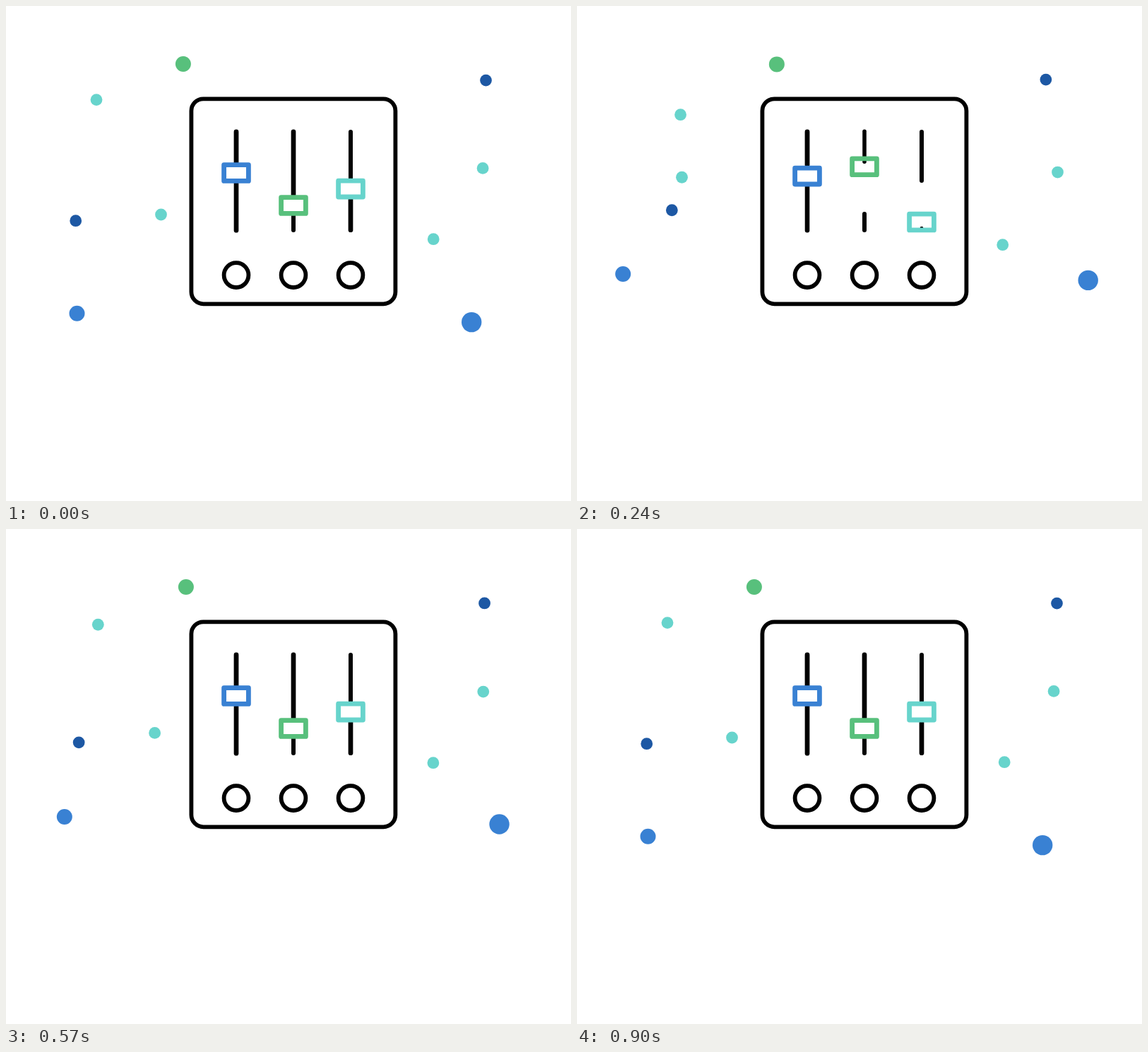
These frames come from a looping animation (800 by 700 pixels, 930 ms). An HTML page:

```html
<!DOCTYPE html>
<html lang="en">
<head>
<meta charset="utf-8">
<title>Mixer panel</title>
<style>
  html, body { margin: 0; width: 100%; height: 100%; overflow: hidden; background: #fff; }
  svg { display: block; width: 800px; height: 700px; }
</style>
</head>
<body>
<svg viewBox="0 0 800 700" fill="none" stroke="#000" stroke-linecap="round" stroke-linejoin="round">
  <rect x="262.4" y="131.3" width="289" height="290" rx="17" stroke-width="5.8"/>
</svg>
<script>
const LOOP = 930, STEP = 30, END = 900;
const BLUE = '#3981d3', NAVY = '#1d58a4', TEAL = '#67d4cc', GREEN = '#58c07c';
const svg = document.querySelector('svg');

function add(tag, attrs) {
  const el = document.createElementNS('http://www.w3.org/2000/svg', tag);
  set(el, attrs);
  return svg.appendChild(el);
}
function set(el, attrs) {
  for (const k in attrs) el.setAttribute(k, attrs[k]);
}
const mix = (a, b, p) => a + (b - a) * p;
const clamp = p => Math.max(0, Math.min(1, p));
const linear = u => u;
const cubic = u => u ** 3;

// Resting place (x, y) and starting offset (dx, dy); ease acts on the time left.
// "late" is an offset kept until the dot snaps to rest.
const dots = [
  { color: GREEN, r: 11, x: 250.9, y: 82, dx: 81, dy: 1 },
  { color: TEAL, r: 8.4, x: 128, y: 132.6, dx: 47, dy: 53.5 },
  { color: TEAL, r: 8.4, x: 219.5, y: 295, dx: -180, dy: -133.8 },
  { color: NAVY, r: 8.4, x: 98.7, y: 303.7, dx: 90.4, dy: -37.9 },
  { color: NAVY, r: 8.4, x: 679.5, y: 105.1, dx: -39.6, dy: -2.6 },
  { color: TEAL, r: 8.4, x: 675.1, y: 229.4, dx: 13.7, dy: 14.3 },
  { color: TEAL, r: 8.4, x: 605.2, y: 329.7, dx: -6.3, dy: 20.3 },
  { color: BLUE, r: 11, x: 100.5, y: 434.8, dx: -48.2, dy: -76, ease: linear },
  { color: BLUE, r: 14.2, x: 659.2, y: 447.1, dx: 68.6, dy: -80.8, ease: linear, late: 14.2 }
];
for (const d of dots) d.el = add('circle', { r: d.r, fill: d.color, stroke: 'none' });

// fixed: still part of the track; tip: moving end of the growing part, from its root.
const sliders = [
  { x: 326, color: BLUE, start: 0, end: 255, knob: [314, 236], tip: [321, 244.5], root: 320.5, fixed: [174.5, 228], width: 6.8 },
  { x: 407, color: GREEN, start: 60, end: 420, knob: [172.6, 282], tip: [172, 274], root: 174.5, fixed: [291, 320], width: 6 },
  { x: 488, color: TEAL, start: 180, end: 570, knob: [314, 258.6], tip: [320, 267], root: 320, fixed: [175, 250], width: 6 }
];
const track = (x, [y1, y2], w) =>
  add('line', { x1: x, x2: x, y1: y1 + w / 2, y2: y2 - w / 2, 'stroke-width': w });

for (const s of sliders) {
  track(s.x, s.fixed, s.width);
  s.grow = add('line', { x1: s.x, x2: s.x });
  s.box = add('rect', { x: s.x - 17.4, width: 34.8, height: 22.8, stroke: s.color, 'stroke-width': 6.8 });
  add('circle', { cx: s.x, cy: 380.6, r: 17.4, 'stroke-width': 5.8 });
}

function drawDot(d, t, rest) {
  const left = rest ? 0 : (d.ease || cubic)(1 - t / END);
  const late = rest ? 0 : d.late || 0;
  set(d.el, { cx: d.x + late + d.dx * left, cy: d.y + d.dy * left });
}

function drawSlider(s, t, rest) {
  const p = rest ? 1 : clamp((t - s.start) / (s.end - s.start));
  const w = mix(4.4, 6.7, p);
  const tip = mix(...s.tip, p);
  const dir = Math.sign(s.tip[1] - s.root);
  const shown = p > 0;
  set(s.box, { y: mix(...s.knob, p) - 11.4, visibility: shown ? 'visible' : 'hidden' });
  set(s.grow, {
    y1: s.root + dir * w / 2,
    y2: tip - dir * w / 2,
    'stroke-width': w,
    visibility: shown && (tip - s.root) * dir > w ? 'visible' : 'hidden'
  });
}

function draw(now) {
  const t = Math.floor((now % LOOP) / STEP) * STEP;
  const rest = t === 0 || t >= END;
  for (const d of dots) drawDot(d, t, rest);
  for (const s of sliders) drawSlider(s, t, rest);
}

let origin;
function tick(now) {
  origin ??= now;
  draw(Math.max(0, now - origin));
  requestAnimationFrame(tick);
}
draw(0);
requestAnimationFrame(tick);
</script>
</body>
</html>
```
